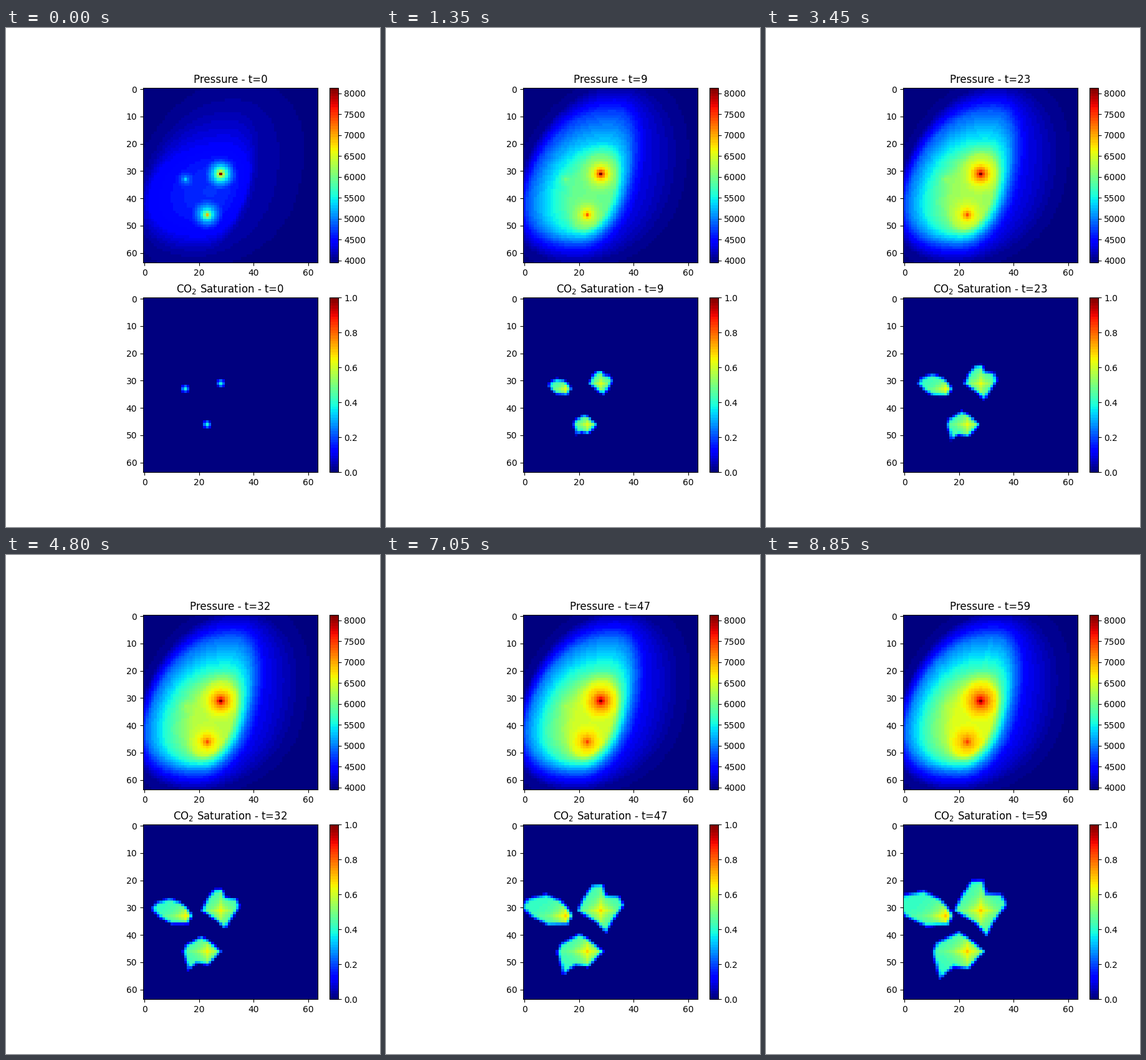
A matplotlib script that plays this animation: 600 px wide and 800 px high, repeating every 9000 ms.

```python
import numpy as np
import matplotlib.pyplot as plt
from matplotlib.animation import FuncAnimation
from matplotlib.path import Path

N, STEPS, INTERVAL = 64, 60, 150
P_MIN, P_MAX, P_FAR = 3955, 8130, 3985
CENTER, SHEAR, POWER = (25, 37), 0.25, 2.2
X, Y = np.meshgrid(np.arange(N), np.arange(N))
SEED = 1.3  # plume radius at the start, in cells

# Egg-shaped isobars: pressure -> reach west, north, east, south.
EARLY = {4600: (11, 10, 7, 9), 4420: (23, 17, 12.5, 17),
         4160: (25.5, 28, 14, 22), 4030: (28, 37, 29, 26)}
LATE = {6500: (7, 13, 7.5, 14), 5750: (16.5, 17.5, 10, 16.5),
        5000: (23.5, 29, 13, 20), 4440: (26, 34, 17, 23.5),
        4030: (28, 39, 31, 27)}

# Well -> (strength, reach, bore) of its pressure cone, early and late,
# and the final corners of its plume relative to the well.
WELLS = {
    (28, 31): ((950, 6, 0.16), (550, 8, 0.45),
               [(-9.5, 0), (-6.7, -5.8), (-3.3, -10.7), (0.7, -10.7), (2, -6),
                (7.5, -5.8), (9.4, -2.2), (5.2, 3.3), (2, 9), (-1.2, 5)]),
    (23, 46): ((750, 6, 0.26), (330, 7.5, 0.45),
               [(-12.5, 0.3), (-11, -3), (-3, -7), (1, -4.2), (6.2, 0),
                (3, 3.2), (0.6, 6.2), (-5, 5.5), (-10, 9.8)]),
    (15, 33): ((300, 3.5, 0.3), (60, 4, 0.5),
               [(-16, -7.3), (-8, -9), (-2, -6), (1.2, -2.5), (2.5, -0.2),
                (1, 3), (-7, 3.7), (-14, 0.3), (-19, -4)]),
}


def egg(west, north, east, south):
    """Scale at which the sheared superellipse passes through each cell."""
    dy = Y - CENTER[1]
    dx = X - CENTER[0] + SHEAR * dy
    u = np.abs(dx) / np.where(dx < 0, west, east)
    v = np.abs(dy) / np.where(dy < 0, north, south)
    return np.maximum((u ** POWER + v ** POWER) ** (1 / POWER), 1e-6)


def basin(isobars, top):
    """Smooth pressure field running through the isobars."""
    rings = [1 / egg(*reach) for reach in isobars.values()]
    rings = np.array([0 * rings[0]] + rings + [1.4 * rings[-1]])
    levels = [top, *isobars, P_FAR]
    field = [np.interp(1, r, levels) for r in rings.reshape(len(levels), -1).T]
    return np.reshape(field, (N, N))


def cone(well, strength, reach, bore):
    r = np.maximum(np.hypot(X - well[0], Y - well[1]), bore)
    return np.maximum(0, strength * np.log(reach / r))


P_EARLY = basin(EARLY, 4700) + sum(cone(w, *c[0]) for w, c in WELLS.items())
P_LATE = basin(LATE, 6560) + sum(cone(w, *c[1]) for w, c in WELLS.items())


def pressure(t):
    c = 0.12
    g = np.log1p(t / c) / np.log1p((STEPS - 1) / c)
    return P_EARLY + g * (P_LATE - P_EARLY)


def outline(well, corners, age):
    """Corners travel from a small seed to their final reach."""
    corners = np.array(corners, float)
    reach = np.hypot(*corners.T)[:, None]
    return well + corners / reach * SEED * (reach / SEED) ** age ** 0.29


def depth(poly):
    """Signed distance to the outline, positive inside."""
    best = np.full((N, N), np.inf)
    for (ax, ay), (bx, by) in zip(poly, np.roll(poly, -1, axis=0)):
        ex, ey = bx - ax, by - ay
        s = np.clip(((X - ax) * ex + (Y - ay) * ey) / (ex * ex + ey * ey), 0, 1)
        best = np.minimum(best, np.hypot(X - ax - s * ex, Y - ay - s * ey))
    cells = np.column_stack([X.ravel(), Y.ravel()])
    inside = Path(poly).contains_points(cells).reshape(N, N)
    return np.where(inside, best, -best)


def saturation(t):
    age = t / (STEPS - 1)
    field = np.zeros((N, N))
    for well, (_, _, corners) in WELLS.items():
        rim = np.clip((depth(outline(well, corners, age)) + 0.6) / 1.5, 0, 1) ** 0.7
        # A star-shaped metric brightens the rows and columns through the well.
        dx, dy = np.abs(X - well[0]), np.abs(Y - well[1])
        r = (dx ** 0.8 + dy ** 0.8) ** 1.25
        body = 0.4 + (0.2 + 0.1 * age) * np.exp(-r / (2 + 4 * np.sqrt(age)))
        field = np.maximum(field, rim * body)
    return field * min(1, 0.65 + 0.12 * t)


fig, axes = plt.subplots(2, 1, figsize=(6, 8), dpi=100)
jet = plt.get_cmap("jet", 64)


def panel(ax, low, high):
    im = ax.imshow(np.zeros((N, N)), cmap=jet, vmin=low, vmax=high)
    fig.colorbar(im, ax=ax, fraction=0.046, pad=0.04)
    return im


p_im = panel(axes[0], P_MIN, P_MAX)
s_im = panel(axes[1], 0, 1)


def update(t):
    p_im.set_data(pressure(t))
    s_im.set_data(saturation(t))
    axes[0].set_title(f"Pressure - t={t}")
    axes[1].set_title(f"CO$_2$ Saturation - t={t}")
    return p_im, s_im


anim = FuncAnimation(fig, update, frames=STEPS, interval=INTERVAL,
                     repeat=True, repeat_delay=0)
plt.show()
```
